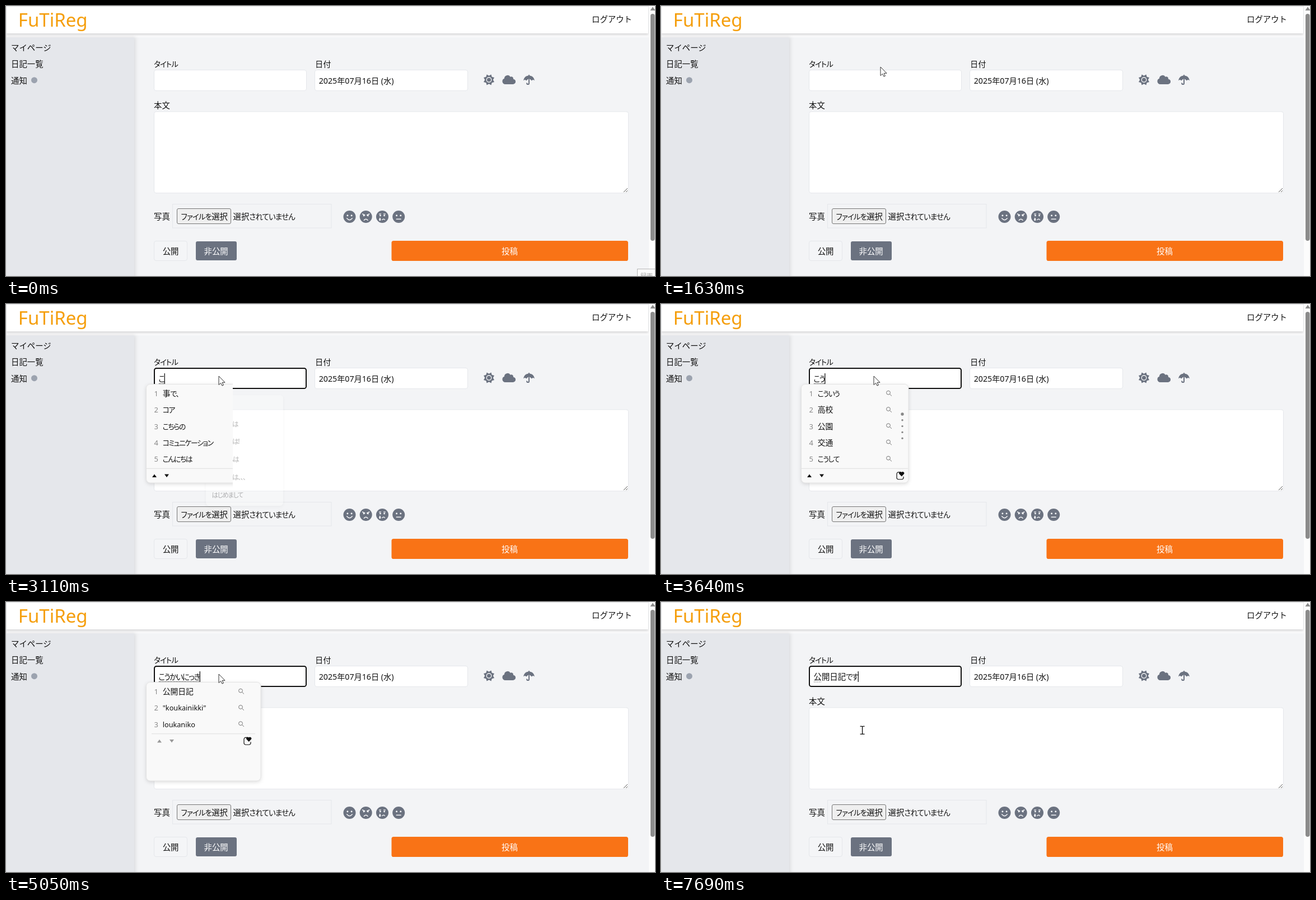
An HTML page for the animation above (8000 ms loop, 1159 by 483 pixels).

```html
<!DOCTYPE html>
<html lang="ja">
<head>
<meta charset="utf-8">
<title>日記の投稿</title>
<style>
html, body { margin: 0; width: 100%; height: 100%; overflow: hidden; background: #f3f4f6; }
svg { display: block; width: 100%; height: 100%; }
text { font-family: "Noto Sans", "Noto Sans CJK JP", "Noto Sans CJK", sans-serif; font-size: 14.4px; fill: #111; white-space: pre; }
.kana { font-size: .93em; font-feature-settings: "palt"; letter-spacing: -.06em; }
#field .kana, #ime .kana, #history .kana { letter-spacing: -.11em; }
.icon { fill: #6b7280; }
.box { fill: #fff; stroke: #e5e7eb; }
.lift { filter: drop-shadow(0 2px 3px rgba(0,0,0,.13)); }
</style>
</head>
<body>
<svg id="stage" viewBox="0 0 1159 483" xmlns="http://www.w3.org/2000/svg">
  <defs><clipPath id="reveal"><rect id="revealBox" x="230" y="130" width="300" height="220"/></clipPath></defs>
  <g id="page"></g>
  <rect id="focus" x="265" y="115" width="271" height="36" rx="3.6" fill="none" stroke="#101010" stroke-width="2"/>
  <text id="field" x="272.5" y="139"></text>
  <g id="marks"></g>
  <rect id="caret" y="124" width="1.2" height="19" fill="#000"/>
  <g id="history"></g>
  <g clip-path="url(#reveal)"><g id="ime"></g></g>
  <g id="tip">
    <rect x="1127.5" y="470.5" width="40" height="20" fill="#fdfdfd" stroke="#b5b5b5"/>
    <text x="1133" y="487" style="font-size:11px;fill:#aaa">録画</text>
  </g>
  <path id="arrow" d="M0 0V15.6L3.6 12.3L6 17.2L8.4 16.1L6.1 11.3H11Z" fill="#fff" stroke="#333"/>
  <path id="beam" d="M-4 -7H-1Q0 -7 0 -6Q0 -7 1 -7H4M0 -6V6M-4 7H-1Q0 7 0 6Q0 7 1 7H4" fill="none" stroke="#111" stroke-width="1.4"/>
</svg>
<script>
const LOOP = 8000;
const $ = id => document.getElementById(id);

// Interface text sets kana in narrow, proportional form.
const narrow = s => s.replace(/[ぁ-ヿ、]+/g, '<tspan class="kana">$&</tspan>');
const text = (x, y, s, style = '') => `<text x="${x}" y="${y}" style="${style}">${s}</text>`;
const rect = (x, y, w, h, r, attrs) =>
  `<rect x="${x}" y="${y}" width="${w}" height="${h}" rx="${r}" ${attrs}/>`;
const line = (d, color, width = 1, attrs = '') =>
  `<path d="${d}" fill="none" stroke="${color}" stroke-width="${width}" ${attrs}/>`;
const dot = (x, y, r, fill) => `<circle cx="${x}" cy="${y}" r="${r}" fill="${fill}"/>`;
const at = (x, y, body) => `<g transform="translate(${x} ${y})">${body}</g>`;

const PALE = '#f3f4f6', GREY = '#6b7280';

function sun() {
  const pts = Array.from({ length: 16 }, (_, i) => {
    const a = i * Math.PI / 8, r = i % 2 ? 10.3 : 7.3;
    return `${(r * Math.sin(a)).toFixed(2)},${(-r * Math.cos(a)).toFixed(2)}`;
  });
  return `<polygon class="icon" points="${pts.join(' ')}"/>` + dot(0, 0, 4.9, PALE) + dot(0, 0, 3.6, GREY);
}

const cloud = '<path class="icon" d="M-11.6 3A5.2 5.2 0 0 0-6.4 8.2H7A4.6 4.6 0 0 0 7.9-1A3.5 3.5 0 0 0 2.7-4.9A5.8 5.8 0 0 0-8.1-1.9A5.2 5.2 0 0 0-11.6 3Z"/>';

const umbrella = '<path class="icon" d="M-10 1C-9-5-5-7.8-.9-8V-9.4H.9V-8C5-7.8 9 -5 10 1Q7.5-2 4.6 1Q2.5-2 0-2Q-2.5-2-4.6 1Q-7.5-2-10 1Z"/>' +
  line('M0 -1V5.7A1.9 1.9 0 0 1-3.8 5.7', GREY, 2, 'stroke-linecap="round"');

function face(x, detail) {
  return at(x, 377, dot(0, 0, 11, GREY) + dot(-3.6, -2.2, 1.5, PALE) + dot(3.6, -2.2, 1.5, PALE) + detail);
}

function page() {
  const stroke = (d, w = 1.4) => line(d, PALE, w, 'stroke-linecap="round"');
  const label = (x, y, s) => text(x, y, narrow(s));
  return [
    rect(0, 0, 1159, 483, 0, `fill="${PALE}"`),
    rect(0, 49, 1148, 7, 0, 'fill="#fafafb"'),
    `<g style="filter:drop-shadow(2px 0 3px rgba(0,0,0,.1))">${rect(0, 56, 229, 440, 0, 'fill="#e5e7eb"')}</g>`,
    `<g style="filter:drop-shadow(0 2px 2px rgba(0,0,0,.16))">${rect(0, 0, 1147, 49, 0, 'fill="#fff"')}</g>`,
    line('M0 .5H1148M.5 0V483', '#e2e3e5'),
    text(21.8, 37, 'FuTiReg', 'font-size:33px;fill:#f59e0b'),
    text(1046, 29, 'ログアウト'),
    text(9, 80, 'マイページ'), text(9, 109.3, '日記一覧'), text(9, 138.6, '通知'),
    dot(50.5, 132.7, 5.5, '#9ca3af'),
    // scrollbar
    rect(1148, 0, 11, 483, 0, 'fill="#fcfcfc"'),
    rect(1151, 14, 7.5, 406, 3.7, 'fill="#8b8b8b"'),
    '<path d="M1150.5 8L1155 1.5L1159.5 8Z" fill="#8b8b8b"/>',
    // form
    label(264, 109, 'タイトル'), text(552, 109, '日付', 'font-size:14.2px'),
    rect(264.5, 114.5, 272, 37, 3.6, 'class="box"'),
    rect(551.5, 114.5, 273, 37, 3.6, 'class="box"'),
    text(558.7, 139, '2025年07月16日 (水)', 'font-size:14.2px'),
    at(862.5, 132, sun()), at(898, 131.7, cloud), at(934, 132.5, umbrella),
    text(264, 183.3, '本文'),
    rect(264.5, 189, 847, 145.5, 3.6, 'class="box"'),
    line('M1103 333L1110 326M1107 333L1110 330', '#555'),
    text(264, 382, '写真'),
    rect(297.5, 354.5, 283.5, 42.5, 0, 'fill="none" stroke="#e5e7eb"'),
    rect(305.5, 362.5, 96, 27, 2.5, 'fill="#efefef" stroke="#767676"'),
    label(312.5, 382, 'ファイルを選択'), label(405.5, 382, '選択されていません'),
    face(613.5, stroke('M-4.8 2.8Q0 8.6 4.8 2.8')),
    face(642.7, stroke('M-6.2 -5L-1.8 -3M6.2 -5L1.8 -3M-3.4 6.2Q0 2.4 3.4 6.2')),
    face(672, stroke('M-.5 5.6Q2 3 4.6 5.4M-5.5 -4.8L-2.5 -5.2M2.5 -5.2L5.5 -4.8', 1.2) +
      `<path d="M-4.2 1.2Q-7.6 5.8-4.2 7.4Q-.8 5.8-4.2 1.2Z" fill="${PALE}"/>`),
    face(701.2, stroke('M-4 4.3H4')),
    rect(264.5, 420.5, 59, 35, 3.6, 'fill="#f4f5f7" stroke="#e5e7eb"'),
    text(279.7, 443.8, '公開'),
    rect(339, 421, 73, 34, 3, `fill="${GREY}"`),
    text(353.5, 443.8, '非公開', 'fill:#fff'),
    rect(688.5, 420, 422.5, 36, 3.6, 'fill="#f97316"'),
    text(885, 443.8, '投稿', 'fill:#fff')
  ].join('');
}

function historyList() {
  const words = ['日記', 'こんにちは', 'こんにちは!', 'こんばんは', 'こんにちは、、、', 'はじめまして'];
  return `<g class="lift">${rect(357, 163, 138, 198, 6, 'fill="#fff"')}</g>` +
    words.map((w, i) => text(367.5, 187 + i * 31.7, narrow(w), 'font-size:12.3px')).join('');
}

// Title text over time, while composing and after.
const TYPED = [
  [0, ''], [2980, 'ｋ'], [3110, 'こ'], [3530, 'こう'], [3670, 'こうｋ'], [3770, 'こうか'], [3850, 'こうかい'],
  [4380, 'こうかいｎ'], [4520, 'こうかいに'], [4660, 'こうかいにｋ'], [4800, 'こうかいにっｋ'], [4960, 'こうかいにっき'],
  [5610, 'こうかいにっきｄ'], [5690, 'こうかいにっきで'], [5870, 'こうかいにっきでｓ'], [5940, 'こうかいにっきです'],
  [6140, '公開日記です']
];

// Candidate panels: right edge, bottom edge, words, extras.
const LATIN = ['公開日記', '"koukainikki"', 'loukaniko'];
const PANELS = [
  [0, null],
  [3040, { right: 418, words: ['事で、', 'コア', 'こちらの', 'コミュニケーション', 'こんにちは'] }],
  [3600, { right: 442, words: ['こういう', '高校', '公園', '交通', 'こうして'], search: 407, heart: 427, dots: 431 }],
  [3850, { right: 418, words: ['公開', '公開日記', '公開タブ', '後悔', '公開された'], search: 383, heart: 403, dots: 407 }],
  [4520, { right: 455, words: ['公開に', '公開日記', '後悔に', '公開日時', '公開日'], search: 420, heart: 440, dots: 444 }],
  [4960, { right: 455, bottom: 320, words: LATIN, search: 420, heart: 431, pad: 9 }],
  [5140, { right: 446, bottom: 262, words: LATIN, search: 420, heart: 431 }],
  [5690, { right: 446, bottom: 262, words: ['公開日記で', '"koukainikkide"', '公開日記です'], search: 420, heart: 431 }],
  [6140, null]
];

// Spans in which the caret is off.
const BLINKS = [[0, 2180], [2710, 2980], [4310, 4380], [5530, 5610], [7000, 7530]];

const APPROACH = [[930, 1127, 425], [1140, 900, 330], [1350, 610, 205], [1490, 455, 135],
  [1630, 392, 109], [1700, 388, 111], [1840, 382, 125], [2050, 380, 129]];
const LEAVE = [[7080, 380, 129], [7230, 393, 150], [7400, 385, 190], [7690, 359.5, 229.5]];

const current = (list, t) => list.filter(e => e[0] <= t).pop()[1];

function along(path, t) {
  const i = path.findIndex(p => p[0] > t);
  if (i < 0) return path[path.length - 1].slice(1);
  const [t0, x0, y0] = path[Math.max(i - 1, 0)], [t1, x1, y1] = path[i];
  const k = t1 > t0 ? Math.max(0, (t - t0) / (t1 - t0)) : 0;
  return [x0 + (x1 - x0) * k, y0 + (y1 - y0) * k];
}

function panel({ right, bottom = 320, words, search, heart, dots, pad = 0 }) {
  const foot = 148 + words.length * 29.25, mid = foot + 13;
  const ink = words.length > 3 ? '#111' : '#999';
  const rows = words.map((w, i) => {
    const y = 165.2 + i * 29.25;
    const size = /[a-z]/.test(w) ? 12.7 : 13.8;
    return text(264.5, y, i + 1, 'font-size:13px;fill:#888') +
      text(279.7, y, narrow(w), `font-size:${size}px`) +
      (search ? at(search, y - 5.5, '<circle cx="-1" cy="-1" r="3.4" fill="none" stroke="#777"/>' + line('M1.5 1.5L5 4.8', '#777')) : '');
  }).join('');
  const tri = (x, s) => `<path d="M${x - 4} ${mid + 2.7 * s}H${x + 4}L${x} ${mid - 2.7 * s}Z" fill="${ink}"/>`;
  const heartIcon = heart ? at(heart, mid,
    line('M0 -6.3H-3A3 3 0 0 0-6 -3.3V3.5A3 3 0 0 0-3 6.5H3A3 3 0 0 0 6 3.5V1.5', '#111', 1.2) +
    '<path d="M2.7 1.2L-1.3 -3A2.5 2.5 0 0 1 2.7 -6.2A2.5 2.5 0 0 1 6.7 -3Z" fill="#111"/>') : '';
  const pager = dots ? [0, 1, 2, 3, 4].map(i =>
    dot(dots, 197 + i * 10.8, i ? 1.7 : 2.7, '#888')).join('') : '';
  return `<g class="lift">${rect(250.5, 143.5, right - 250.5, bottom - 143.5, 7, 'fill="#f9f9f9" stroke="#e3e3e3"')}</g>` +
    line(`M${251 + pad} ${foot}H${right - 1 - pad}`, '#dedede') +
    rows + tri(265 + pad, 1) + tri(287 + pad, -1) + heartIcon + pager;
}

function underline(t, end) {
  if (t < 2980) return '';
  if (t < 6140) return line(`M273 142.5H${end}`, '#333', 1, 'stroke-dasharray="1.5 1"');
  if (t < 6470) return line('M273 142.5H301', '#111', 2) + line(`M303 143H${end}`, '#333');
  return line('M273 143H286', '#555', 1, 'stroke-dasharray="1.5 1.5"');
}

const shown = (id, on) => $(id).setAttribute('visibility', on ? 'visible' : 'hidden');
const cache = {};
function fill(id, html) {
  if (cache[id] === html) return;
  cache[id] = html;
  $(id).innerHTML = html;
}

function pointer(t) {
  const leaving = t >= 7150;
  const [start, step] = leaving ? [7150, 77] : [930, 70];
  const held = start + Math.floor((t - start) / step) * step;
  const [x, y] = along(leaving ? LEAVE : APPROACH, held);
  const beam = leaving && y > 189;
  shown('arrow', t >= 930 && !beam);
  shown('beam', beam);
  $(beam ? 'beam' : 'arrow').setAttribute('transform', `translate(${x.toFixed(1)} ${y.toFixed(1)})`);
}

function draw(t) {
  shown('tip', t < 70);
  shown('focus', t >= 2180);
  fill('field', narrow(current(TYPED, t)));
  const end = 272.5 + (cache.field ? $('field').getComputedTextLength() : 0);
  $('caret').setAttribute('x', end);
  shown('caret', !BLINKS.some(([a, b]) => t >= a && t < b));
  fill('marks', underline(t, end));

  const fade = t < 2980 ? (t - 2180) / 270 : 1 - (t - 2980) / 190;
  $('history').setAttribute('opacity', Math.min(1, Math.max(0, fade)));

  const list = current(PANELS, t);
  fill('ime', list ? panel(list) : '');
  const open = Math.max(0, Math.floor((t - 2970) / 70)) * 77.5;
  $('revealBox').setAttribute('width', Math.min(300, 20 + open));
  pointer(t);
}

$('page').innerHTML = page();
$('history').innerHTML = historyList();
const began = performance.now();
function tick() {
  draw((performance.now() - began) % LOOP);
  requestAnimationFrame(tick);
}
tick();
</script>
</body>
</html>
```
